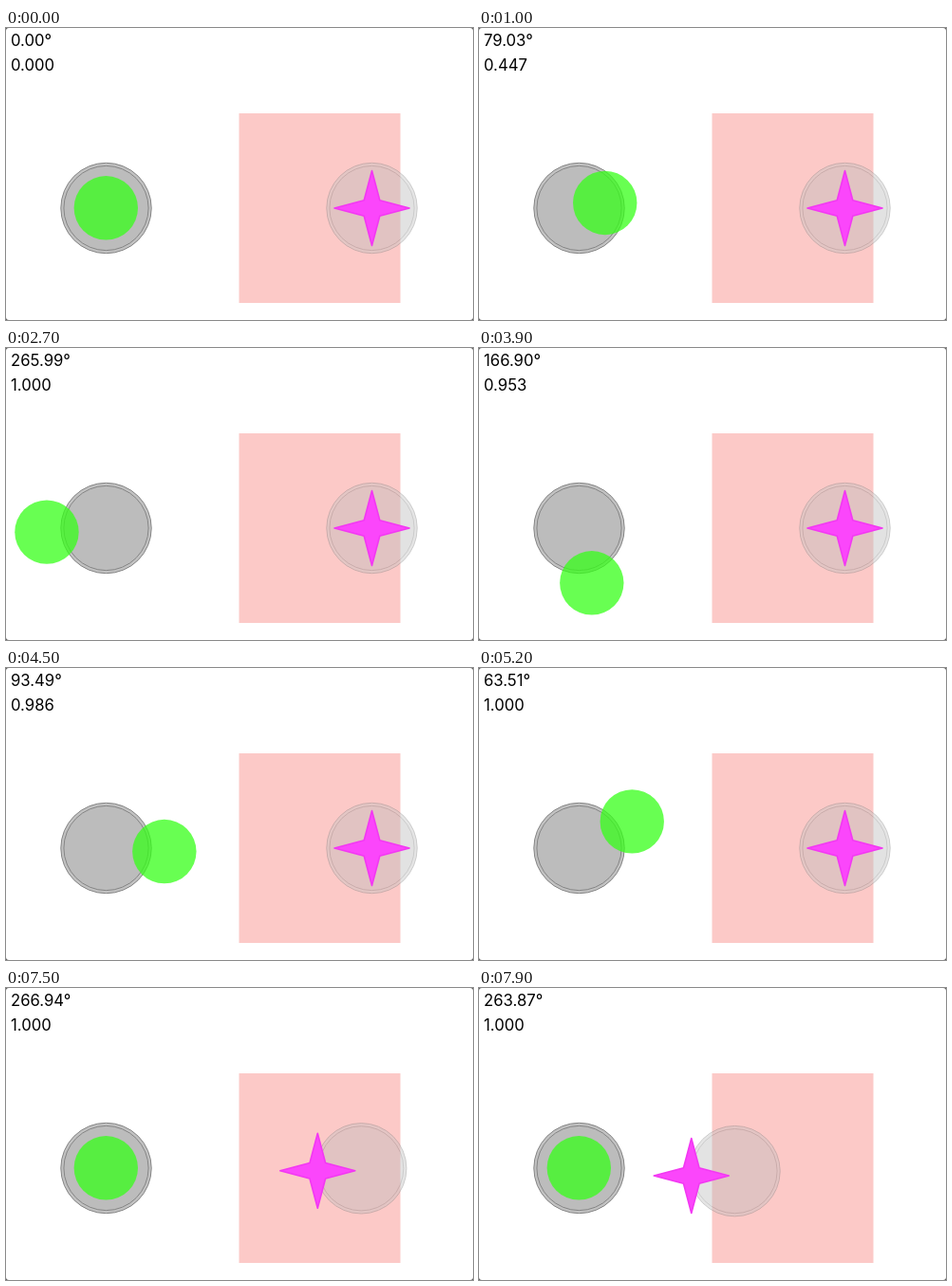
Write an HTML page that moves like this. It is 492 px wide and 308 px high and loops after 8000 ms.

```html
<!DOCTYPE html>
<html lang="en">
<head>
<meta charset="utf-8">
<title>Joysticks</title>
<style>
  html, body { margin: 0; width: 100%; height: 100%; overflow: hidden; background: #555; }
  svg { display: block; width: 492px; height: 308px; background: #fff; border-radius: 3px; }
  text { font: 16.7px Inter, "Liberation Sans", sans-serif; fill: #000; }
  #knob { filter: blur(.7px); }
  #star { filter: blur(.4px); }
</style>
</head>
<body>
<svg viewBox="0 0 492 308">
  <defs>
    <g id="base" stroke="#858585">
      <circle r="47.7" fill="#c2c2c2"/>
      <circle r="44.6" fill="#bcbcbc"/>
    </g>
  </defs>
  <text id="angle" x="5" y="18.7"></text>
  <text id="force" x="5" y="44.7"></text>
  <rect x="245.5" y="90" width="170" height="200" fill="#fcc9c7"/>
  <use href="#base" x="105.5" y="190"/>
  <circle id="knob" r="33.7" fill="#36ff18" fill-opacity=".75"/>
  <use id="floating" href="#base" opacity=".42"/>
  <path id="star" d="M0-39.5L8.3-8.3 39.5 0 8.3 8.3 0 39.5-8.3 8.3-39.5 0-8.3-8.3Z" fill="#fb46fb" stroke="#f238f2" stroke-width="1.6" stroke-linejoin="round"/>
</svg>
<script>
const LOOP = 8000, STEP = 100;
const KNOB_REACH = 62.5, STAR_REACH = 46;
const REST = [0, 0], RIGHT = [62.24, -12.06], LEFT = [-62.35, 4.372];
const $ = id => document.getElementById(id);

const progress = (t, from, to) => (t - from) / (to - from);
const swing = u => (1 - Math.cos(Math.PI * Math.min(1, Math.max(0, u)))) / 2;
const mix = (a, b, u) => a + (b - a) * u;
const mixPoint = (a, b, u) => [mix(a[0], b[0], u), mix(a[1], b[1], u)];

// Angles run clockwise from straight up
function polar(degrees, r) {
  const a = degrees * Math.PI / 180;
  return [Math.sin(a) * r, -Math.cos(a) * r];
}

function knobOffset(t) {
  if (t > 5600) return REST;
  if (t < 1582) return mixPoint(REST, RIGHT, swing(progress(t, 500, 1582)));
  if (t < 2900) return mixPoint(RIGHT, LEFT, swing(progress(t, 1582, 2700)));
  // Sweep under the base: speed up to the bottom, then slow down on the right
  const first = t < 3900;
  const u = first ? progress(t, 2900, 3900) ** 2 : 1 - progress(t, 5200, 3900) ** 2;
  return first
    ? polar(mix(265.99, 166.9, u), KNOB_REACH * mix(1, 0.953, u))
    : polar(mix(166.9, 63.51, u), KNOB_REACH * mix(0.953, 1, u));
}

// The star drags its base along once it is pulled past its reach
function starDrag(t) {
  const u = Math.max(0, progress(t, 7100, 7900));
  const pull = 162 * u ** 1.5;
  const slide = Math.max(0, pull - STAR_REACH);
  return {
    base: [-slide, slide * 0.027],
    offset: polar(270 - 6.13 * u, Math.min(pull, STAR_REACH))
  };
}

function place(id, x, y) {
  $(id).setAttribute("transform", `translate(${x} ${y})`);
}

function draw(now) {
  const t = Math.floor(now % LOOP / STEP) * STEP;

  let [kx, ky] = knobOffset(t);
  const scale = Math.min(1, KNOB_REACH / (Math.hypot(kx, ky) || 1));
  kx *= scale;
  ky *= scale;
  place("knob", 105.3 + kx, 189.8 + ky);

  const { base: [bx, by], offset: [sx, sy] } = starDrag(t);
  place("floating", 385.5 + bx, 190 + by);
  place("star", 385.5 + bx + sx, 190 + by + sy);

  const [x, y, reach] = t > 7100 ? [sx, sy, STAR_REACH] : [kx, ky, KNOB_REACH];
  const distance = Math.hypot(x, y);
  const degrees = distance ? (Math.atan2(x, -y) * 180 / Math.PI + 360) % 360 : 0;
  $("angle").textContent = degrees.toFixed(2) + "°";
  $("force").textContent = Math.min(1, distance / reach).toFixed(3);
}

const start = performance.now();
function tick() {
  draw(performance.now() - start);
  requestAnimationFrame(tick);
}
tick();
</script>
</body>
</html>
```
